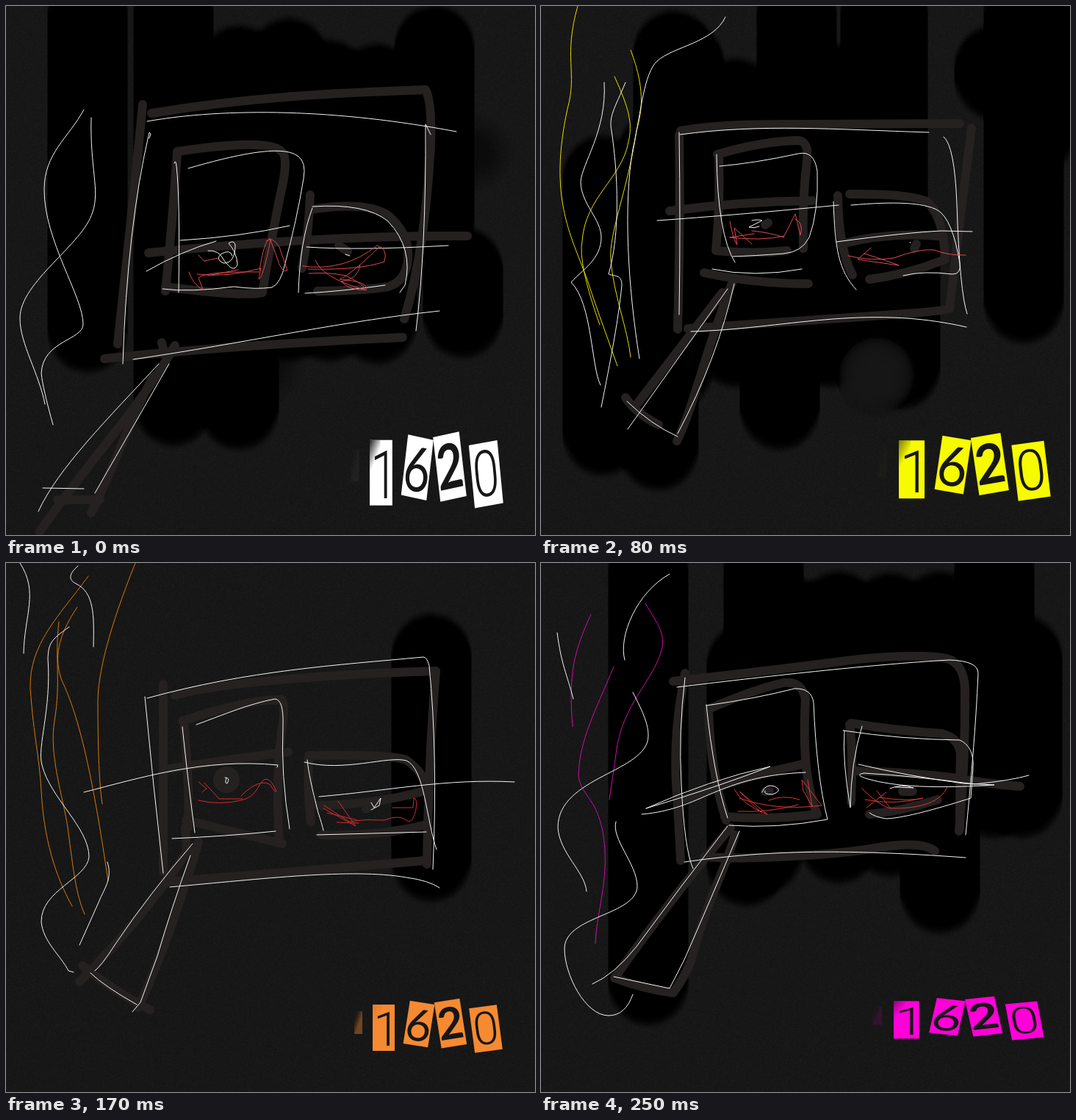
An HTML page with a canvas that plays this animation: 720x720 px, repeating every 0.33 s.

```html
<!DOCTYPE html>
<html lang="en">
<head>
<meta charset="utf-8">
<title>1620</title>
<style>
html, body { margin: 0; width: 100%; height: 100%; overflow: hidden; background: #171717; }
canvas { display: block; width: 100vw; height: 100vh; }
</style>
</head>
<body>
<canvas id="stage" width="720" height="720"></canvas>
<script>
const ctx = document.getElementById('stage').getContext('2d');
const LOOP = 330;

// soot, wiped: vertical brush strokes [x, top, bottom]; tag: [x, y, scaleX, scaleY] of the number
const scenes = [
  {
    until: 80, color: '#fff', plumeColor: '#fff', red: '#d9484a',
    tag: [495, 578, 1.028, 1.413], shade: .95, smear: .04,
    soot: [[111, 0, 450], [228, 0, 550], [317, 75, 555], [385, 65, 435], [440, 95, 435],
      [505, 100, 438], [583, 48, 300], [622, 350, 430], [637, 200, 200], [350, 490, 490]],
    wiped: [],
    marker: `M186 134Q180 200 152 460 M198 146C330 124 450 118 571 114Q580 130 578 190C572 290 562 360 542 426
      M134 480Q300 462 540 451 M233 198C290 190 360 182 375 198Q384 205 377 240Q360 320 349 390Q320 396 217 382
      M233 200Q226 300 217 388 M194 336C300 325 460 312 628 313`,
    markerDetail: `M414 257Q412 310 403 357 M415 277Q490 265 520 285Q550 310 547 345Q544 375 520 382Q480 388 424 388
      M453 326L465 334 M212 458L216 475 M230 462C180 550 120 610 46 715 M200 505C170 560 150 620 116 690 M70 672H128`,
    frame: `M192 157C300 138 450 140 613 171 M195 180L197 174L195 172Q165 300 159 487
      M578 175L571 161Q572 330 558 442 M173 481C330 458 450 430 590 415`,
    eyes: `M248 221C310 203 375 188 397 204Q409 212 405 235Q396 290 380 350Q374 378 362 383Q340 386 310 382Q250 390 213 385
      M229 214Q231 208 232 218Q237 260 235 390 M237 319Q320 314 386 299 M191 361Q240 333 286 320
      M275 333Q290 332 296 345Q310 365 315 352Q314 335 303 323Q310 318 312 325Q312 350 296 350Q285 345 292 338Q305 330 308 340
      M417 273Q490 268 520 293Q555 330 543 380L536 390 M417 275Q400 320 398 390 M407 391Q460 388 516 380
      M409 328Q480 333 602 326 M462 338l6 2`,
    smoke: `M106 141C85 180 52 200 52 250C52 320 105 395 105 433C105 455 50 455 48 500Q50 520 64 570
      M116 152C114 220 128 250 118 280C105 325 19 375 19 425C19 460 45 500 53 542`,
    stem: 'M208 487C140 560 70 630 44 688 M222 487Q180 560 121 663 M50 656L106 657',
    plume: '',
    scribble: `M249 362Q255 380 268 386L262 370Q270 361 345 362 M262 339Q272 350 270 347L289 343
      M260 365Q300 370 347 357L344 372Q350 370 360 318Q352 315 345 360 M354 320Q362 312 372 328L383 360Q375 365 368 340L359 316
      M275 367L316 359 M404 354Q460 362 505 326Q520 330 515 348Q480 360 411 358
      M421 346Q430 370 490 387Q495 375 454 372Q470 365 508 328 M412 364Q440 362 462 367Q490 380 488 386Q470 388 456 375Q480 372 482 352`
  },
  {
    until: 170, color: '#f7fb00', plumeColor: '#e6dc00', red: '#dc4b4d',
    tag: [487, 580, 1.169, 1.254], shade: .55, smear: .02,
    soot: [[84, 225, 590], [160, 190, 610], [180, 55, 500], [195, 70, 200], [265, 120, 470], [325, 200, 555],
      [348, 0, 470], [395, 100, 470], [462, 0, 430], [472, 0, 430], [489, 310, 500],
      [657, 0, 410], [617, 75, 105], [674, 0, 180]],
    wiped: [[457, 498, 506]],
    marker: `M190 170Q240 160 350 161L570 160 M586 166Q570 290 556 412Q540 416 480 420Q330 430 200 439
      M188 175Q190 300 186 440 M240 202Q300 184 350 183Q365 184 362 210Q355 270 357 330
      M242 205Q244 270 238 333Q290 338 335 333 M175 279Q270 266 370 265 M222 363Q290 378 364 378`,
    markerDetail: `M404 258Q405 330 424 366 M420 256Q500 255 525 266Q548 285 550 345Q500 365 447 372
      M408 324Q480 306 548 314 M305 298l4-3 M508 330l3-6
      M262 372C220 480 210 540 185 592 M247 390Q190 465 132 540 M115 533Q130 555 160 570`,
    frame: `M189 175C300 160 400 168 528 172 M188 172Q190 300 188 420
      M548 178Q563 190 566 270Q570 390 580 419 M204 443C330 440 440 405 579 437`,
    eyes: `M239 202Q240 310 264 349 M243 218Q290 214 350 201Q372 196 376 225Q378 280 365 315Q355 335 330 337Q290 340 261 341
      M158 292Q260 285 405 271 M233 358Q290 370 355 358 M398 266C400 330 405 360 429 386
      M422 271C480 266 520 267 540 278Q560 290 570 350Q572 365 560 365Q520 360 493 367
      M402 321Q500 308 545 306L587 307 M287 292Q295 290 301 292L283 301Q290 303 297 300 M502 322h1`,
    smoke: `M251 15C235 50 180 55 158 75C140 92 137 140 125 195C112 270 118 380 134 480
      M86 104C90 170 55 215 54 240C55 270 82 290 82 315C82 345 55 360 41 376C70 405 68 490 81 516
      M115 104C100 140 92 150 96 170C105 230 108 310 92 365C100 368 110 365 110 380C105 430 95 480 82 546`,
    stem: 'M254 385Q190 475 118 576 M263 378Q240 480 186 582 M117 538Q150 570 186 586',
    plume: `M50 0C30 70 50 90 36 140C10 260 40 310 62 370C75 410 90 450 104 490
      M122 60C145 120 135 150 130 170C118 250 92 310 95 345C98 390 118 440 122 478
      M100 96C120 140 125 160 119 185C110 235 60 260 56 320Q50 350 80 434`,
    scribble: `M257 293Q262 320 267 325L263 302L287 324 M257 315Q300 320 331 313L346 283L353 312Q358 295 346 290
      M287 306Q310 308 331 315 M257 315L290 310
      M418 340Q450 348 480 343Q515 330 535 332Q555 340 578 339 M449 329L431 345L487 353Q475 348 440 337`
  },
  {
    until: 250, color: '#f58a32', plumeColor: '#d47a0e', red: '#d02c30',
    tag: [499, 592, 1, 1], shade: .1, smear: .4,
    soot: [[579, 118, 412]],
    wiped: [],
    marker: `M214 165V420 M216 434Q400 420 570 405 M230 180C300 160 480 150 585 147Q575 270 573 410
      M240 215Q330 185 375 186Q380 190 377 215Q366 290 372 380 M242 215Q250 300 248 360 M245 350L376 382
      M222 280Q300 268 384 257`,
    markerDetail: `M288 295a12 12 0 1 0 24 0a12 12 0 1 0-24 0 M297 295h6
      M412 265Q410 310 415 352 M412 262Q520 260 545 268Q575 290 575 320 M414 330Q500 330 570 310
      M430 370Q510 372 572 356 M490 335l8-10
      M244 360L246 390 M248 390Q190 480 100 570 M262 380Q220 520 180 605 M104 548Q150 585 196 608`,
    frame: `M192 184C330 146 450 139 568 128Q573 128 576 140Q588 260 581 417
      M189 182Q200 300 214 422 M223 441C350 430 470 415 545 428Q575 432 590 442`,
    eyes: `M259 220C300 205 330 192 366 185Q378 186 377 220Q374 290 386 362 M240 223Q248 300 257 367
      M226 375Q300 372 367 365 M106 312C180 293 270 265 370 275l-1 3 M410 268Q412 290 425 340Q430 355 432 364
      M406 271C460 285 520 262 545 269C570 280 572 350 586 390 M426 318C520 310 600 293 692 298
      M423 370Q500 368 572 366 M298 292q8 0 3 8q-4 0-1-7 M497 326L501 333L510 320L508 330L497 336`,
    smoke: `M19 0C45 40 25 70 24 123 M98 4C85 15 85 23 95 28C120 40 120 70 119 114
      M86 87C60 105 58 110 57 130C62 200 42 250 49 275C60 320 113 360 113 400C110 430 48 445 48 488C50 515 75 535 85 555L92 557
      M138 407C145 430 135 440 126 462L100 520`,
    stem: 'M254 382Q195 450 148 520Q130 548 121 555 M251 398Q225 470 206 535L183 598L172 611 M115 558Q135 577 178 601',
    plume: `M112 18C70 75 32 110 33 170C38 240 45 260 48 310C52 390 75 440 90 467
      M97 60C70 100 65 130 76 160C100 210 118 290 139 433 M176 0C140 90 125 150 125 190Q125 290 131 328
      M72 80C66 130 75 160 66 215C58 260 78 320 84 360C92 420 95 450 107 478`,
    scribble: `M262 298L273 307L267 312 M262 323Q290 330 320 323Q335 320 343 306Q355 280 368 311Q365 312 360 302Q345 292 320 317
      M270 299L290 321H322 M433 330L467 352Q490 348 515 350Q535 342 545 350Q553 357 558 335Q560 320 555 320L554 333H526
      M432 334L476 358L452 324 M437 340L478 350 M450 353L480 354`
  },
  {
    until: 330, color: '#ff00d8', plumeColor: '#cc0fa6', red: '#d83834',
    tag: [480, 589, 1.157, .81], shade: .5, smear: .12,
    soot: [[146, 0, 580], [280, 130, 418], [303, 0, 400], [350, 70, 350], [405, 60, 387], [475, 62, 378],
      [543, 60, 455], [617, 0, 325], [655, 120, 325]],
    wiped: [],
    marker: `M180 161Q300 148 400 135C470 125 530 125 552 130Q575 136 577 170Q578 270 569 365
      M196 150Q180 230 184 300Q188 360 190 405 M222 400C300 405 420 395 460 387Q520 378 536 392
      M230 198Q290 172 330 163Q355 160 360 185Q354 290 376 342Q310 350 250 345 M228 200Q230 280 252 350
      M355 274Q260 295 190 323`,
    markerDetail: `M420 220Q425 250 422 325 M422 218Q480 228 545 232Q570 238 571 262Q570 290 570 360
      M430 283Q500 285 560 292Q600 300 652 304 M447 342Q490 338 540 322 M492 311h14 M305 311h6
      M258 360Q178 455 100 565Q140 580 180 585Q205 550 210 520C230 450 250 420 264 370`,
    frame: `M185 169C300 155 450 138 555 132Q595 133 595 150C592 220 585 300 578 370
      M196 156Q187 230 191 300Q195 390 207 416 M195 407C300 392 400 388 578 401`,
    eyes: `M225 193Q235 290 254 347 M225 194Q290 185 345 171Q368 170 371 190Q375 290 390 349Q320 362 256 357
      M143 334Q230 295 312 277Q240 305 143 334 M137 342C220 335 240 290 360 285
      M413 228Q410 270 421 333Q422 270 437 222 M411 228Q490 240 570 241Q590 250 588 280L585 320Q500 347 470 348Q455 346 447 340
      M432 274Q500 290 575 300L617 302Q500 310 445 294Q425 288 440 286Q510 290 590 301Q640 296 664 289
      M301 312Q305 300 318 304Q330 310 315 315Q302 315 305 310 M475 307Q490 300 507 306L482 305`,
    smoke: `M175 15C130 40 105 100 114 132 M22 95C28 140 35 150 44 185
      M125 176C140 205 146 220 146 235C146 285 23 290 23 360C25 395 60 420 62 447
      M102 352C95 375 131 410 131 440C130 480 32 480 32 525C32 560 60 616 92 616Q115 616 125 587`,
    stem: 'M254 358Q190 440 130 522Q100 560 70 573 M270 365Q230 460 195 540L175 579L99 563',
    plume: `M68 70C45 120 37 150 43 223 M142 55C160 85 168 95 165 115C155 160 110 190 102 260Q98 290 93 322
      M99 141C75 200 52 240 51 290C55 320 82 320 87 390C90 440 75 480 74 518`,
    scribble: `M263 308Q275 330 308 342L270 311L300 340 M270 320Q320 338 382 330L355 295L357 310L369 331L363 295
      M268 338Q310 340 350 329 M310 323Q330 315 352 322 M437 307Q460 330 475 334Q540 335 553 305
      M457 310L475 333 M441 322Q480 330 520 320Q500 325 460 319 M443 333L470 312`
  }
];

// dx and baseline place the digit relative to its card's centre
const cards = [
  { digit: '1', x: 514, y: 632.5, w: 30, h: 63, turn: 0, dx: 4, baseline: 24.5, font: '300 64px Roboto, sans-serif' },
  { digit: '6', x: 562, y: 627.5, w: 34, h: 59, turn: 9, dx: 0, baseline: 23, font: '400 60px Lato, sans-serif' },
  { digit: '2', x: 605, y: 626.7, w: 35, h: 63, turn: -9, dx: 0, baseline: 21, font: '700 60px Lato, sans-serif' },
  { digit: '0', x: 653, y: 634, w: 38, h: 61, turn: -7.5, dx: 0, baseline: 21, font: '300 62px Roboto, sans-serif' }
];

function makePaper() {
  const paper = new OffscreenCanvas(720, 720);
  const pen = paper.getContext('2d');
  const image = pen.createImageData(720, 720);
  let seed = 1620;
  for (let i = 0; i < image.data.length; i += 4) {
    seed = (seed * 1664525 + 1013904223) >>> 0;
    image.data.fill(20 + (seed >>> 16) % 7, i, i + 3);
    image.data[i + 3] = 255;
  }
  pen.putImageData(image, 0, 0);
  return paper;
}

function makeBrush(rgb) {
  const brush = new OffscreenCanvas(110, 110);
  const pen = brush.getContext('2d');
  const fade = pen.createRadialGradient(55, 55, 18, 55, 55, 55);
  fade.addColorStop(0, `rgba(${rgb},.5)`);
  fade.addColorStop(1, `rgba(${rgb},0)`);
  pen.fillStyle = fade;
  pen.fillRect(0, 0, 110, 110);
  return brush;
}

const paper = makePaper(), sootBrush = makeBrush('0,0,0'), wipeBrush = makeBrush('23,23,23');

function smudge(strokes, brush) {
  for (const [x, top, bottom] of strokes)
    for (let y = top; y <= bottom; y++) ctx.drawImage(brush, x - 55, y - 55);
}

function stroke(path, color, width) {
  ctx.strokeStyle = color;
  ctx.lineWidth = width;
  ctx.stroke(new Path2D(path));
}

function fadeRect(x, y, w, h, from, to) {
  const fade = ctx.createLinearGradient(x, y, x + w, y + h / 8);
  fade.addColorStop(0, from);
  fade.addColorStop(1, to);
  ctx.fillStyle = fade;
  ctx.fillRect(x, y, w, h);
}

function drawNumber({ tag: [left, top, sx, sy], color, shade, smear }) {
  ctx.save();
  ctx.translate(left, top);
  ctx.scale(sx, sy);
  ctx.translate(-499, -592);
  ctx.textAlign = 'center';
  for (const { digit, x, y, w, h, turn, dx, baseline, font } of cards) {
    ctx.save();
    ctx.translate(x, y);
    ctx.rotate(turn * Math.PI / 180);
    ctx.fillStyle = color;
    ctx.fillRect(-w / 2, -h / 2, w, h);
    if (digit === '1') fadeRect(-w / 2, -h / 2, 14, h, `rgba(20,20,20,${shade})`, 'rgba(20,20,20,0)');
    ctx.fillStyle = '#171717';
    ctx.font = font;
    ctx.fillText(digit, dx, baseline);
    ctx.restore();
  }
  ctx.globalAlpha = smear;
  fadeRect(474, 610, 11, 31, 'transparent', color);
  ctx.restore();
}

function draw(scene) {
  ctx.drawImage(paper, 0, 0);
  smudge(scene.soot, sootBrush);
  smudge(scene.wiped, wipeBrush);
  ctx.lineCap = ctx.lineJoin = 'round';
  stroke(scene.marker, '#242120', 12);
  stroke(scene.markerDetail, '#242120', 12);
  stroke(scene.plume, scene.plumeColor, 1);
  for (const part of ['frame', 'eyes', 'smoke', 'stem']) stroke(scene[part], '#f4f4f4', 1);
  stroke(scene.scribble, scene.red, 1);
  drawNumber(scene);
}

let shown;
function tick() {
  const time = performance.now() % LOOP;
  const scene = scenes.find(s => time < s.until);
  if (scene !== shown) draw(shown = scene);
  requestAnimationFrame(tick);
}
tick();
</script>
</body>
</html>
```
